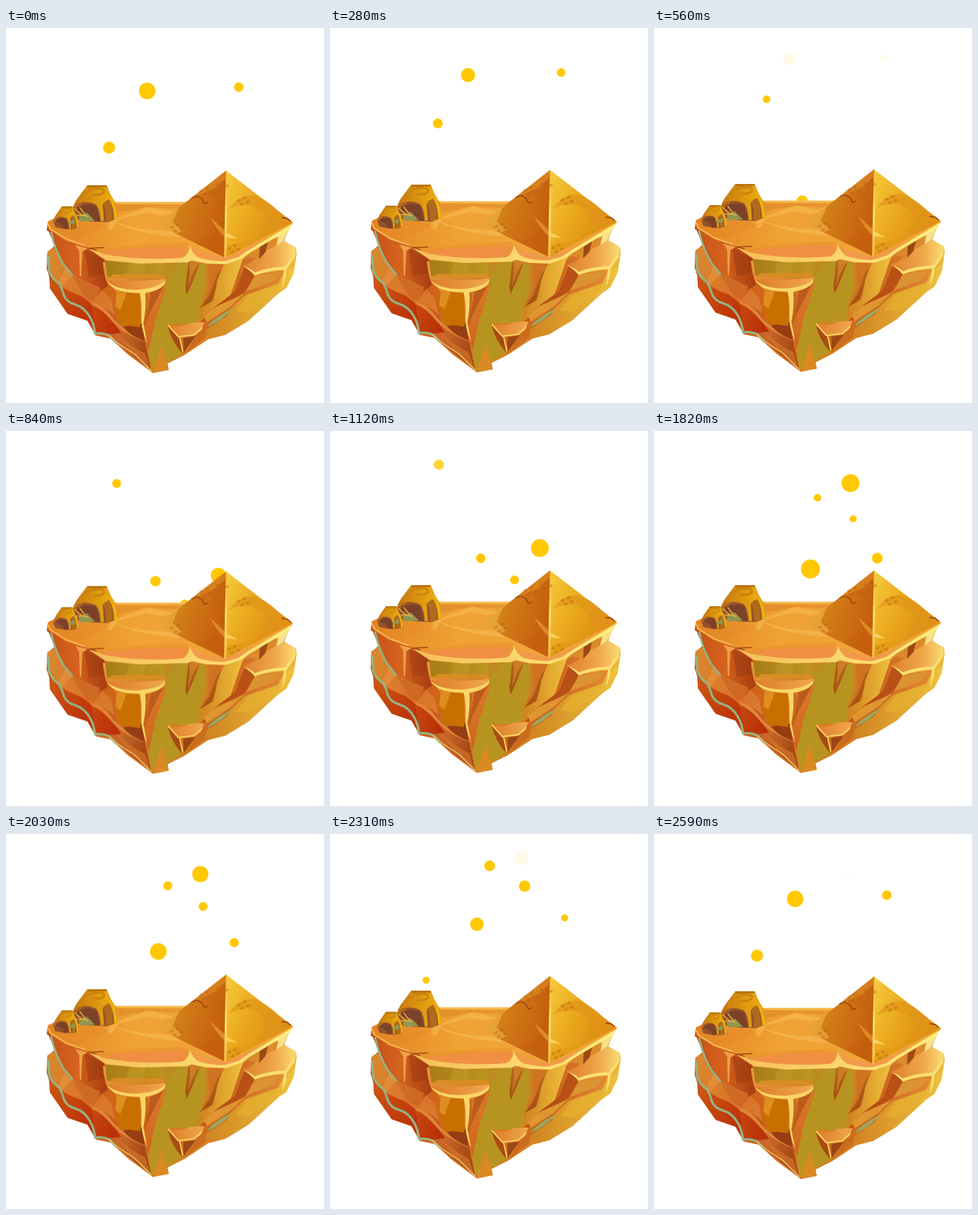
Animation of 500 by 589 pixels, one loop 2660 ms. Source, as an HTML page without scripts:

```html
<!DOCTYPE html>
<html lang="en">
<head>
<meta charset="utf-8">
<title>Floating desert island</title>
<style>
html, body { margin: 0; width: 100%; height: 100%; overflow: hidden; background: #fff; }
svg { display: block; width: 500px; height: 589px; }

.island { animation: bob 2660ms linear infinite; }
.bubbles circle { fill: #ffc800; animation: 2660ms linear infinite; }
.bubbles .b1 { animation-name: rise1; }
.bubbles .b2 { animation-name: rise2; }
.bubbles .b3 { animation-name: rise3; }
.bubbles .b4 { animation-name: rise4; }
.bubbles .b5 { animation-name: rise5; }
.bubbles .b6 { animation-name: rise6; }

.line { fill: none; stroke-linecap: round; stroke-linejoin: round; }
.green { stroke: #95b383; }
.glow { stroke: #fbd765; }
.crack { stroke: #9c4310; }

@keyframes bob {
  0%, 100% { transform: translateY(0); }
  21.05% { transform: translateY(-2px); }
  42.1% { transform: translateY(-5px); }
  52.6%, 57.9% { transform: translateY(-7px); }
  68.4% { transform: translateY(-5px); }
  86.8% { transform: translateY(-1px); }
  97.4% { transform: translateY(0); }
}
@keyframes rise1 {
  0%, 100% { transform: translate(222px, 99px) scale(13); opacity: 1; }
  10.5% { opacity: 1; }
  21.05% { transform: translate(212px, 49px) scale(9); opacity: .1; }
  23.7% { transform: translate(211px, 44px) scale(9); opacity: 0; }
  47.4% { transform: translate(225px, 298px) scale(10); opacity: 0; }
  50% { opacity: 1; }
  57.9% { transform: translate(233px, 260px) scale(13); }
  68.4% { transform: translate(246px, 217px) scale(15); }
  86.8% { transform: translate(231px, 142px) scale(10.5); }
  97.4% { transform: translate(222px, 102px) scale(13); }
}
@keyframes rise2 {
  0%, 100% { transform: translate(366px, 93px) scale(7.5); opacity: 1; }
  10.5% { opacity: 1; }
  21.05% { transform: translate(361px, 47px) scale(6); opacity: .06; }
  23.7% { transform: translate(360px, 42px) scale(6); opacity: 0; }
  50% { transform: translate(335px, 268px) scale(7); opacity: 0; }
  52.6% { opacity: 1; }
  68.4% { transform: translate(351px, 200px) scale(8.5); }
  86.8% { transform: translate(369px, 132px) scale(5.5); }
  97.4% { transform: translate(366px, 96px) scale(7.5); }
}
@keyframes rise3 {
  0%, 100% { transform: translate(162px, 188px) scale(9.5); opacity: 1; }
  21.05% { transform: translate(177px, 112px) scale(6); }
  39.5% { opacity: 1; }
  42.1% { transform: translate(171px, 53px) scale(8); opacity: .8; }
  47.4% { transform: translate(168px, 42px) scale(7); opacity: 0; }
  71% { transform: translate(138px, 285px) scale(6); opacity: 0; }
  73.7% { opacity: 1; }
  86.8% { transform: translate(151px, 230px) scale(5.5); }
  97.4% { transform: translate(162px, 191px) scale(9.5); }
}
@keyframes rise4 {
  0%, 18% { transform: translate(338px, 284px) scale(10); opacity: 0; }
  21.05% { transform: translate(338px, 270px) scale(10); opacity: 1; }
  42.1% { transform: translate(330px, 184px) scale(14); }
  57.9% { transform: translate(316px, 120px) scale(10); }
  68.4% { transform: translate(309px, 82px) scale(14); }
  77% { opacity: 1; }
  86.8% { transform: translate(301px, 38px) scale(11); opacity: .1; }
  89.5%, 100% { transform: translate(300px, 33px) scale(10); opacity: 0; }
}
@keyframes rise5 {
  0%, 13.2% { transform: translate(232px, 297px) scale(8); opacity: 0; }
  15.8% { opacity: 1; }
  21.05% { transform: translate(233px, 272px) scale(9); }
  42.1% { transform: translate(237px, 200px) scale(7.5); }
  57.9% { transform: translate(252px, 142px) scale(7); }
  68.4% { transform: translate(257px, 105px) scale(6); }
  86.8% { transform: translate(251px, 50px) scale(8.5); opacity: 1; }
  94.7%, 100% { transform: translate(248px, 37px) scale(7); opacity: 0; }
}
@keyframes rise6 {
  0%, 26.3% { transform: translate(276px, 290px) scale(6); opacity: 0; }
  29% { opacity: 1; }
  42.1% { transform: translate(290px, 234px) scale(7); }
  57.9% { transform: translate(306px, 175px) scale(7.5); }
  68.4% { transform: translate(313px, 138px) scale(5.5); }
  86.8% { transform: translate(306px, 82px) scale(9); opacity: 1; }
  97.4% { transform: translate(305px, 68px) scale(6); opacity: .04; }
  100% { transform: translate(305px, 65px) scale(6); opacity: 0; }
}
</style>
</head>
<body>
<svg viewBox="0 0 500 589">
  <defs>
    <linearGradient id="base"><stop stop-color="#c64a10"/><stop offset=".4" stop-color="#d5731c"/><stop offset=".75" stop-color="#d98a22"/><stop offset="1" stop-color="#eab83c"/></linearGradient>
    <linearGradient id="plateau"><stop stop-color="#e48424"/><stop offset=".35" stop-color="#f0a233"/><stop offset="1" stop-color="#f0a63c"/></linearGradient>
    <linearGradient id="wall"><stop stop-color="#b9410f"/><stop offset=".5" stop-color="#d2601c"/><stop offset="1" stop-color="#a83c10"/></linearGradient>
    <linearGradient id="ledge" x2="1" y2=".6"><stop stop-color="#d88a30"/><stop offset="1" stop-color="#dc7128"/></linearGradient>
    <linearGradient id="red" x2=".6" y2="1"><stop stop-color="#cd5a14"/><stop offset="1" stop-color="#bb2f08"/></linearGradient>
    <linearGradient id="ember" x2="1" y2=".4"><stop stop-color="#c8480f"/><stop offset="1" stop-color="#b83009"/></linearGradient>
    <linearGradient id="rust" x2="1" y2=".5"><stop stop-color="#c63c0c"/><stop offset=".6" stop-color="#c9682a"/><stop offset="1" stop-color="#a64a16"/></linearGradient>
    <linearGradient id="shelf"><stop stop-color="#de7d28"/><stop offset="1" stop-color="#f0a850"/></linearGradient>
    <linearGradient id="pillar" x2=".7" y2="1"><stop stop-color="#e79a3c"/><stop offset="1" stop-color="#d0641d"/></linearGradient>
    <linearGradient id="olive"><stop stop-color="#a87c18"/><stop offset="1" stop-color="#bd961f"/></linearGradient>
    <linearGradient id="brown" x2="0" y2="1"><stop stop-color="#b96b18"/><stop offset="1" stop-color="#a44f12"/></linearGradient>
    <linearGradient id="gold" x2="1" y2="0"><stop stop-color="#cf8120"/><stop offset="1" stop-color="#efc23c"/></linearGradient>
    <linearGradient id="cliff" x2="1" y2="0"><stop stop-color="#bd5012"/><stop offset="1" stop-color="#e38a34"/></linearGradient>
    <linearGradient id="shine"><stop stop-color="#de7f2c"/><stop offset=".6" stop-color="#efa64b"/><stop offset="1" stop-color="#fbdc70"/></linearGradient>
    <linearGradient id="faceL" x2="1" y2=".4"><stop stop-color="#e5a02c"/><stop offset=".45" stop-color="#d17d18"/><stop offset="1" stop-color="#c8600f"/></linearGradient>
    <linearGradient id="faceR" x2="1" y2=".6"><stop stop-color="#f7cd3d"/><stop offset=".5" stop-color="#e9a51b"/><stop offset="1" stop-color="#df8713"/></linearGradient>
    <linearGradient id="cap"><stop stop-color="#c9780e"/><stop offset="1" stop-color="#f0b410"/></linearGradient>
    <linearGradient id="edge" x2="0" y2="1"><stop stop-color="#f4b836"/><stop offset=".5" stop-color="#ffe36e"/><stop offset="1" stop-color="#f5c04a"/></linearGradient>
    <linearGradient id="lip"><stop stop-color="#f6bc57"/><stop offset=".5" stop-color="#fbd66c"/><stop offset="1" stop-color="#fff07c"/></linearGradient>
    <g id="bricks" fill="#b65f10" opacity=".4"><path d="M0 4l5-3 3 3-5 3zM9 0l5-3 3 3-5 3zM5 10l5-3 3 3-5 3zM14 6l5-3 3 3-5 3z"/></g>
    <g id="rock">
      <path fill="#94522c" d="M128 247H158L165 263 172 275 176 299 160 305 133 304 110 300 104 285 113 267Z"/>
      <path fill="#b0661c" d="M112 268L107 277 104 287 116 284 120 275Z"/>
      <path fill="#7c4229" d="M112 281Q130 274 142 280L148 304 134 304Q132 290 112 287Z"/>
      <path fill="#b06a1b" d="M153 276L162 268 167 276 168 302 157 305Q158 288 153 276Z"/>
      <path fill="url(#cap)" d="M128 247H158L165 263 171 272 176 299 170 301Q169 278 162 269 153 273 152 278L154 303 149 304Q148 284 141 277 128 271 113 275L106 283 113 267Z"/>
      <path fill="#b8720c" d="M128 247H158L159 250 129 251Z"/>
      <path class="line" stroke="#c9830d" stroke-width="3" d="M120 264Q123 256 138 253 156 250 154 258 150 263 138 262"/>
    </g>
  </defs>

  <g class="bubbles">
    <circle class="b1" r="1"/><circle class="b2" r="1"/><circle class="b3" r="1"/>
    <circle class="b4" r="1"/><circle class="b5" r="1"/><circle class="b6" r="1"/>
  </g>

  <g class="island">
    <path fill="url(#base)" d="M66 304L105 285 170 274H290L451 306 444 318 437 335 456 345 457 355 453 381 441 408 428 417 381 460 345 482 318 489 280 514 254 527 256 537 231 542 192 513 165 488 141 483 128 460 97 449 69 409 68 391 64 378 65 352 77 342 70 320 64 318Z"/>

    <!-- left cliffs -->
    <path fill="url(#wall)" d="M66 317L128 344 155 362 152 378 160 405 149 413 105 389 85 362Z"/>
    <path fill="#d96a25" d="M70 318L114 340 117 391 104 388 88 363Z" opacity=".4"/>
    <path fill="#8f3210" d="M123 346L153 364 154 386 130 392Z" opacity=".4"/>
    <path fill="#f0a047" d="M109 341L129 346 120 351 118 390 116 390 115 350Z"/>
    <path fill="url(#ledge)" d="M65 351L77 344 90 372 104 388 148 408 139 429 134 433 119 421 96 413 82 402 69 384Z"/>
    <path fill="#ba5a1c" d="M103 388L148 409 138 428 126 424Z" opacity=".4"/>
    <path fill="#eda24b" d="M93 377L104 389 88 406 82 400Z" opacity=".4"/>
    <path fill="url(#red)" d="M69 390L88 407 101 414 119 422 135 434 141 480 128 459 97 449 70 410Z"/>
    <path fill="url(#rust)" d="M135 432L150 411 164 424 176 463 218 490 228 538 173 494 160 483 141 478Z"/>
    <path fill="url(#ember)" d="M135 434Q157 442 165 457L181 479 159 481 141 477Z"/>
    <path fill="#dd8230" d="M135 432L151 411 165 425 171 451 157 441Z" opacity=".8"/>
    <path fill="#e08636" d="M133 431Q155 435 168 456 187 477 219 489L221 494Q187 482 168 462 151 441 135 435Z"/>
    <path fill="#963d13" d="M184 469L216 464 221 493Q195 484 184 469Z"/>
    <path fill="#d97a2a" d="M172 478Q195 500 219 511L226 535 198 511Z" opacity=".6"/>
    <path class="line green" stroke-width="3.2" d="M71 321Q77 349 91 372L104 388"/>
    <path class="line green" stroke-width="3.6" d="M66 359L68 383Q74 395 84 402 89 411 91 420 96 431 108 434 124 439 132 454 138 464 140 480 152 478 162 483L173 494"/>
    <path class="line" stroke="#e6b963" stroke-width="2" d="M162 483L174 494 203 513 228 538"/>

    <!-- centre -->
    <path fill="url(#pillar)" d="M157 395L152 368 250 368 253 410 235 455 225 505 218 492 214 465 204 420 173 414Z"/>
    <path fill="url(#olive)" d="M156 366H252L251 390 229 395 159 391Z"/>
    <path fill="#c5a02b" d="M195 367H221L214 394 187 394Z" opacity=".4"/>
    <path fill="#d88d22" d="M161 393L168 387H247L252 394Z"/>
    <path fill="#c77000" d="M174 413L211 418 211 470 180 466 171 438Z"/>
    <path fill="#df8c20" d="M174 413L190 415 180 443 172 437Z"/>
    <path fill="#b9570e" d="M214 418L224 418 221 466 213 470Z" opacity=".5"/>
    <path fill="#a94a16" d="M227 416L248 405 231 438 220 461Z" opacity=".6"/>
    <path fill="url(#shelf)" d="M157 396Q183 401 252 394 249 407 222 414 212 417 204 414 169 414 157 396Z"/>
    <path fill="#fbd765" d="M158 397Q174 412 208 411 244 408 252 394 251 411 219 416 221 437 216 464L222 495Q211 470 213 450 214 432 210 416 169 417 158 397Z"/>
    <path fill="#b79420" d="M252 371L290 366 284 416 305 370 323 372 320 425 306 440 301 465 260 465 254 466 260 485 278 511 255 525 229 539 224 510 235 458 251 411Z"/>
    <path fill="#c08726" d="M248 371L273 368 254 390 251 411Z" opacity=".6"/>
    <path fill="url(#brown)" d="M287 362L305 369 294 397 284 419 282 408Z"/>
    <path fill="#e49736" d="M289 360L309 366 300 374 292 390 286 408 289 385Z" opacity=".5"/>
    <path fill="#d98a23" d="M230 541L245 498 256 537Z"/>

    <!-- right cliffs -->
    <path fill="url(#brown)" d="M318 368L347 366 333 399 324 429 305 440 319 412Z"/>
    <path fill="url(#gold)" d="M344 366L374 360 364 406 346 427 307 461 303 443 327 428 332 398Z"/>
    <path fill="#d87924" d="M314 368L350 365 332 387 320 420 306 440 315 405Z" opacity=".75"/>
    <path fill="url(#cliff)" d="M372 364L400 346 386 376 390 388 438 380 428 402 375 420 344 449 312 470 304 464 329 437 353 420Z"/>
    <path fill="#b64c13" d="M376 373L393 389 376 414 347 433 327 439 360 414Z" opacity=".85"/>
    <path fill="#db9331" d="M391 389L431 383 420 398 377 414Z"/>
    <path fill="url(#gold)" d="M309 475L343 451 378 419 429 402 441 381 454 372 452 386 441 408 428 417 381 460 345 481 313 487Z"/>
    <path fill="#cb6c1e" d="M303 475L318 454 355 435 348 452 315 474 313 487 282 511Z"/>
    <path fill="#df9530" d="M311 454L329 438 375 417 353 438 316 462Z"/>
    <path fill="#e6b12f" d="M362 444L381 420 429 402 425 412 382 447Z" opacity=".65"/>
    <path fill="#97aa66" d="M355 441Q344 457 316 470 322 459 355 441Z"/>
    <path fill="url(#shine)" d="M371 373Q394 368 407 348L437 334 456 345 454 356 440 378Q413 378 391 388L385 379Z"/>
    <path fill="#fbdf72" d="M373 374Q384 377 391 384 414 375 439 375L456 350 454 361 441 379 440 391 434 408 437 380Q414 380 391 389 385 381 373 374Z"/>
    <path fill="#dc8a2b" d="M376 358L444 314 437 335 407 351 398 363Z"/>
    <path fill="#9d4915" d="M399 344L412 336 408 352 398 363Z"/>
    <path fill="#fae089" d="M412 334L446 313 436 335 425 342 428 328Z"/>

    <!-- small ledge -->
    <path fill="#a84a12" d="M254 467L273 484 277 511Q260 492 254 467Z"/>
    <path fill="#cc6f20" d="M274 484L309 468 294 490 279 510Z"/>
    <path fill="#9a4813" d="M279 487L298 484 279 510Z"/>
    <path fill="url(#shelf)" d="M254 466Q279 471 288 463L312 462 307 475 296 483 271 486Z"/>
    <path class="line glow" stroke-width="2" d="M255 467L271 485 296 482 308 471M273 486L278 508"/>

    <!-- plateau -->
    <path fill="url(#plateau)" d="M66 304L105 285 170 273H290L451 306 442 316 378 351 346 364 293 351 287 363 200 365 152 358 127 344 93 333 67 316Z"/>
    <path fill="#f4bd55" d="M170 273H286L278 276H175Z"/>
    <path fill="#dc8428" d="M174 277L276 278 266 284 224 281 176 290Z" opacity=".5"/>
    <path fill="#f5b84f" d="M224 281L265 290 246 294 220 290 177 301 165 318 157 312 166 301Z" opacity=".7"/>
    <path fill="#f5b950" d="M176 306Q204 317 246 318L286 323 269 328Q209 323 174 307Z" opacity=".7"/>
    <path fill="#f0a237" d="M185 301Q214 290 243 297L240 315Q205 315 185 301Z"/>
    <path fill="#e28529" d="M67 306L92 311 137 306 167 310 113 333 92 333Z" opacity=".3"/>
    <path fill="#e99130" d="M136 350L210 340 286 337 288 349 279 362 196 364Z" opacity=".6"/>
    <path fill="#f08f43" d="M149 353Q208 343 284 344L280 362 204 364Z"/>
    <path fill="#f19a4b" d="M289 343L306 352 342 360 372 350 410 332 372 362 339 368 301 362Z"/>
    <path fill="url(#lip)" d="M126 344L153 355Q210 366 276 361 287 358 289 342 294 356 304 361 325 367 344 366L365 360 381 349 451 307 444 317 382 354 371 362 346 371 315 370 292 365 286 368 210 370 157 365Z"/>
    <path class="line" stroke="#f5bd56" stroke-width="2" d="M66 308L70 316 96 332 124 342"/>
    <path class="line crack" stroke-width="1.4" d="M128 346L154 345M131 346L142 349"/>

    <!-- pyramid -->
    <path fill="url(#faceL)" d="M346 224L240 307 267 323 345 361Z"/>
    <path fill="#edab3e" d="M240 307L272 281 262 305 277 318 267 323Z" opacity=".75"/>
    <path fill="#b95b0e" d="M346 238L320 260Q341 286 335 316 317 331 295 336L345 361Z" opacity=".2"/>
    <path fill="#e59c2c" d="M346 224L292 267 329 251 346 235Z" opacity=".4"/>
    <path fill="url(#faceR)" d="M346 224L451 305 345 361Z"/>
    <path fill="#df9418" d="M350 285Q367 260 391 263 416 272 434 294L451 305 380 342Q413 319 405 291 383 268 350 285Z" opacity=".65"/>
    <path fill="#e39a17" d="M350 340Q390 336 432 314L345 361Z" opacity=".7"/>
    <path fill="#e59c2c" d="M321 297L344 318V328Q331 317 321 297Z" opacity=".7"/>
    <path fill="url(#edge)" d="M346 224L348 239 347 322 364 331 347 329 346 361 343 361 344 300Z"/>
    <use href="#bricks" x="303" y="252"/>
    <use href="#bricks" x="329" y="242"/>
    <use href="#bricks" x="257" y="309"/>
    <use href="#bricks" x="347" y="342"/>
    <use href="#bricks" x="362" y="267"/>
    <path class="line crack" stroke-width="1.8" d="M292 267L300 264 308 268 312 276 317 274M434 298L442 299 447 303"/>

    <!-- rocks -->
    <use href="#rock"/>
    <use href="#rock" transform="translate(16 128.5) scale(.56 .615)"/>
    <path fill="#92964e" d="M114 296L127 290 140 303 117 304ZM100 304L108 300 109 307 98 309Z"/>
    <path class="line" stroke="#f2b746" stroke-width="1.5" d="M108 284L118 293 129 296M112 294L124 294M116 282L124 292"/>
  </g>
</svg>
</body>
</html>
```
